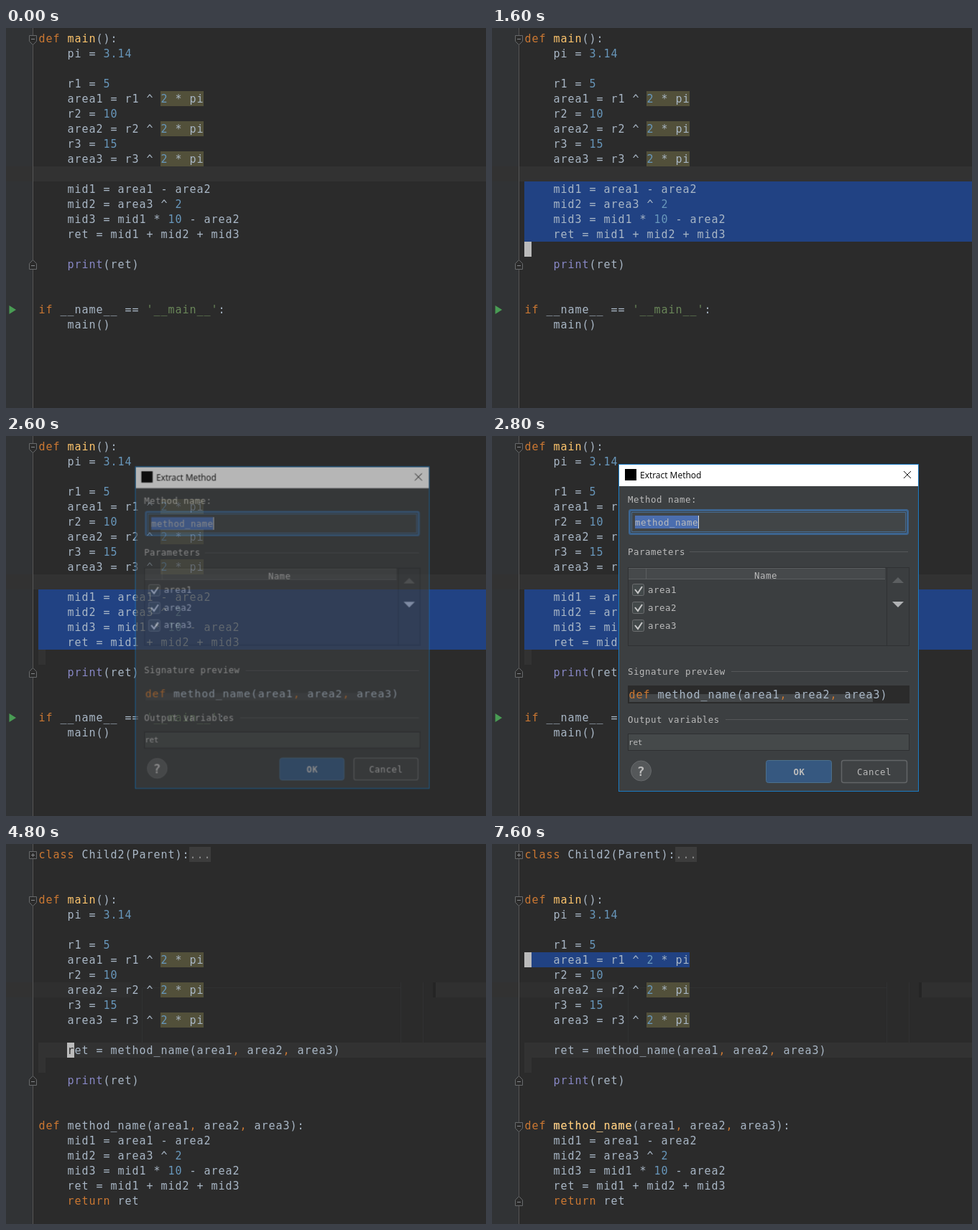
Write an HTML page that moves like this. It is 668 px wide and 530 px high and loops after 8000 ms.

```html
<!DOCTYPE html>
<html lang="en">
<head>
<meta charset="utf-8">
<title>Extract Method</title>
<style>
  html, body { margin: 0; width: 100%; height: 100%; overflow: hidden; background: #2b2b2b; }
  svg { display: block; width: 668px; height: 530px; }
  text { white-space: pre; fill: #a9b7c6; }
  .code { font: 15px "DejaVu Sans Mono", "Noto Sans Mono", monospace; letter-spacing: .97px; }
  .ui { font: 12.4px "DejaVu Sans Mono", "Noto Sans Mono", monospace; letter-spacing: .53px; fill: #bbb; }
  .small { font-size: 11px; letter-spacing: -.2px; }
  .title { font: 12px "Open Sans", "Noto Sans", sans-serif; }
</style>
</head>
<body>
<svg id="stage" viewBox="0 0 668 530"></svg>
<script>
const LOOP = 8000, LEFT = 45, CELL = 10, ROW = 21;
const stage = document.getElementById('stage');
const rowTop = row => 4 + ROW * row;
const colX = col => LEFT + CELL * col;

function add(parent, tag, attrs = {}, content) {
  const el = document.createElementNS('http://www.w3.org/2000/svg', tag);
  for (const key in attrs) el.setAttribute(key, attrs[key]);
  if (content !== undefined) el.textContent = content;
  parent.appendChild(el);
  return el;
}
const rect = (parent, x, y, width, height, fill, more) =>
  add(parent, 'rect', { x, y, width, height, fill, ...more });
const path = (parent, d, stroke, more) =>
  add(parent, 'path', { d, stroke, fill: 'none', ...more });

function play(el, frames) {
  const anim = el.animate(frames.map(f => ({ easing: 'step-end', ...f })),
    { duration: LOOP, iterations: Infinity });
  anim.startTime = 0;
}

// Shows an element only during the given [from, to] spans.
function during(el, ...spans) {
  const frames = [];
  if (spans[0][0] > 0) frames.push({ offset: 0, opacity: 0 });
  for (const [from, to] of spans) {
    frames.push({ offset: from / LOOP, opacity: 1 });
    if (to < LOOP) frames.push({ offset: to / LOOP, opacity: 0 });
  }
  frames.push({ offset: 1, opacity: frames[frames.length - 1].opacity });
  play(el, frames);
  return el;
}
const layer = (parent, ...spans) => during(add(parent, 'g'), ...spans);

const KEYWORD = '#cc7832', DEFINED = '#ffc66d', NUMBER = '#6897bb';
const STRING = '#6a8759', BUILTIN = '#8888c6', PLAIN = '#a9b7c6';
const TOKENS = /'[^']*'|\w+(?:\.\d+)?|[^\s\w]/g;

function colorOf(token, before) {
  if (/^(def|if|class|return|,)$/.test(token)) return KEYWORD;
  if (token[0] === "'") return STRING;
  if (/^\d/.test(token)) return NUMBER;
  if (token === 'print') return BUILTIN;
  if (token === 'main' && before.endsWith('def ')) return DEFINED;
  return PLAIN;
}

function codeText(parent, x, y, line) {
  const text = add(parent, 'text', { class: 'code', y });
  for (const match of line.matchAll(TOKENS)) {
    const fill = colorOf(match[0], line.slice(0, match.index));
    add(text, 'tspan', { x: x + CELL * match.index + .5, style: `fill:${fill}` }, match[0]);
  }
}
const codeLines = (parent, row, lines) => lines.forEach((line, i) =>
  line && codeText(parent, LEFT, rowTop(row + i) + 16, line));

const cells = (parent, row, col, count, fill, rows = 1) =>
  rect(parent, colX(col), rowTop(row), count * CELL, rows * ROW, fill);

function foldMark(parent, row, kind) {
  const y = rowTop(row);
  const outline = {
    open: `M32.5 ${y + 6.5}h10v8l-5 5l-5-5z`,
    close: `M32.5 ${y + 17.5}v0v14h10v-8l-5-5l-5 5z`.replace('v0v14', ''),
    folded: `M32.5 ${y + 6.5}h10v10h-10z`
  }[kind];
  path(parent, outline, '#686a6c', { fill: '#2b2b2b' });
  const mid = y + (kind === 'close' ? 12.5 : 11.5);
  path(parent, `M35 ${mid}h5` + (kind === 'folded' ? `M37.5 ${mid - 2.5}v5` : ''), '#85878a');
}

const setup = ['def main():', '    pi = 3.14', '',
  '    r1 = 5', '    area1 = r1 ^ 2 * pi',
  '    r2 = 10', '    area2 = r2 ^ 2 * pi',
  '    r3 = 15', '    area3 = r3 ^ 2 * pi'];
const body = ['    mid1 = area1 - area2', '    mid2 = area3 ^ 2',
  '    mid3 = mid1 * 10 - area2', '    ret = mid1 + mid2 + mid3'];
const extracted = ['def method_name(area1, area2, area3):', ...body, '    return ret'];

const HIGHLIGHT = '#323232', SELECTION = '#214283', DUPLICATE = '#52503a', CARET = '#bbbbbb';
const BEFORE = [0, 4800], AFTER = [4800, LOOP];

function drawEditor() {
  rect(stage, 0, 0, 668, 530, '#2b2b2b');
  rect(stage, 0, 0, 37, 530, '#313335');
  rect(stage, 0, rowTop(9), 37, ROW, HIGHLIGHT);
  rect(stage, 37, 0, 1, 530, '#555555');

  const before = layer(stage, BEFORE);
  rect(before, 38, rowTop(9), 630, ROW, HIGHLIGHT);
  [4, 6, 8].forEach(row => cells(before, row, 17, 6, DUPLICATE));
  rect(layer(before, [1600, 4800]), LEFT, rowTop(10), 623, ROW * 4, SELECTION);
  codeLines(before, 0, [...setup, '', ...body, '', '    print(ret)']);
  foldMark(before, 0, 'open');
  foldMark(before, 15, 'close');

  const entry = layer(before, [0, 4600]);
  codeLines(entry, 18, ["if __name__ == '__main__':", '    main()']);
  add(entry, 'path', { d: 'M4.5 387l9.5 6l-9.5 6z', fill: '#499c54' });
  codeLines(layer(before, [4600, 4800]), 18, extracted);

  const after = layer(stage, AFTER);
  rect(after, 38, rowTop(9), 137, ROW, '#2f2f2f');
  rect(after, 598, rowTop(9), 70, ROW, '#303030');
  rect(after, 594, rowTop(9), 4, ROW, '#252525');
  path(after, 'M190 200.5H549M189.5 201V277M549.5 193V277M580.5 193V277', '#303132');
  rect(after, LEFT, rowTop(13), 623, ROW, HIGHLIGHT);
  [7, 9, 11].forEach(row => cells(after, row, 17, 6, DUPLICATE));
  cells(layer(after, [5800, 6000], [6400, 6800]), 13, 4, 1, '#40332b');
  cells(layer(after, [5000, 6800]), 15, 10, 3, '#344134');
  cells(layer(after, [7600, LOOP]), 7, 0, 23, SELECTION);
  cells(after, 0, 21, 3, '#3c3c3c');
  codeLines(after, 0, ['class Child2(Parent):', '', '', ...setup, '',
    '    ret = method_name(area1, area2, area3)', '', '    print(ret)', '', '', ...extracted]);
  add(after, 'text', { class: 'code', x: colX(21) + .5, y: 20, style: 'fill:#8c8c8c' }, '...');
  foldMark(after, 0, 'folded');
  foldMark(after, 3, 'open');
  foldMark(after, 15, 'close');

  const parsed = layer(after, [5000, LOOP]);
  add(parsed, 'text', { class: 'code', x: colX(4) + .5, y: rowTop(18) + 16, style: `fill:${DEFINED}` }, 'method_name');
  foldMark(parsed, 18, 'open');
  foldMark(parsed, 23, 'close');

  cells(layer(stage, [2200, LOOP]), 14, 0, 1, HIGHLIGHT);
}

function drawCarets() {
  [[10, 800, 1600], [14, 1600, 2200], [8, 6400, 7000], [7, 7000, LOOP]]
    .forEach(([row, from, to]) => cells(layer(stage, [from, to]), row, 0, 1, CARET));
  const onRet = layer(stage, [4800, 5800], [6000, 6400]);
  cells(onRet, 13, 4, 1, CARET);
  add(onRet, 'text', { class: 'code', x: colX(4) + .5, y: rowTop(13) + 16, style: 'fill:#2b2b2b' }, 'r');

  [[279, 2200, 2600], [275, 5400, 6000]].forEach(([y, from, to]) =>
    path(layer(stage, [from, to]), `M57 ${y + 1.5}h8M61.5 ${y + 1}v16M57 ${y + 16.5}h8`, '#c8c8c8'));
}

function drawDialog() {
  const dialog = add(stage, 'g', { style: 'transform-origin:385px 268px' });
  play(dialog, [
    { offset: 0, opacity: 0, transform: 'none' },
    { offset: 2600 / LOOP, opacity: .66, transform: 'translate(-.5px,-.4px) scale(.981,.984)' },
    { offset: 2800 / LOOP, opacity: 1, transform: 'none' },
    { offset: 4800 / LOOP, opacity: 0, transform: 'none' },
    { offset: 1, opacity: 0, transform: 'none' }
  ]);
  const label = (x, center, content, more) =>
    add(dialog, 'text', { class: 'ui', x, y: center + 4.5, ...more }, content);
  const middle = { 'text-anchor': 'middle' };
  const section = (center, name, lineX) => {
    label(189, center, name);
    path(dialog, `M${lineX} ${center + .5}H579`, '#555759');
  };

  rect(dialog, 177, 40, 416, 455, '#3c3f41');
  rect(dialog, 177, 40, 416, 30, '#ffffff');
  rect(dialog, 185, 46, 16, 16, '#000000');
  const title = (parent, fill) =>
    add(parent, 'text', { class: 'title', x: 206, y: 59, style: `fill:${fill}` }, 'Extract Method');
  const active = layer(dialog, [0, 4600]);
  title(active, '#000');
  path(active, 'M573 49l10 10M583 49l-10 10', '#111');
  rect(active, 176.5, 39.5, 417, 456, 'none', { stroke: '#1a7bc4' });
  const inactive = layer(dialog, [4600, LOOP]);
  title(inactive, '#999');
  rect(inactive, 176.5, 39.5, 417, 456, 'none', { stroke: '#45494b' });

  label(189, 88, 'Method name:');
  rect(dialog, 191.5, 103.5, 387, 33, '#3d4144', { stroke: '#3d6590', 'stroke-width': 3, rx: 2 });
  rect(dialog, 194.5, 106.5, 381, 27, '#414547', { stroke: '#466d94' });
  rect(dialog, 199, 111, 88, 18, '#4b6eaf');
  label(199, 120, 'method_name');
  rect(layer(dialog, [2600, 3000], [3600, 4000], [4600, 4800]), 287, 111, 1, 18, '#dddddd');

  section(161, 'Parameters', 275);
  rect(dialog, 189.5, 183.5, 391, 109, '#3b3e40', { stroke: '#2f3133' });
  rect(dialog, 190, 185, 357, 14, '#46494b');
  path(dialog, 'M190 184.5H547M190 199.5H547M214.5 184V200', '#5b5e60');
  path(dialog, 'M549.5 184V293', '#2f3133');
  label(381, 194, 'Name', middle);
  add(dialog, 'path', { d: 'M557 205l8-8l8 8z', fill: '#5c5f61' });
  add(dialog, 'path', { d: 'M557 231h16l-8 8z', fill: '#b0b2b4' });
  ['area1', 'area2', 'area3'].forEach((name, i) => {
    const y = 214 + 25 * i;
    rect(dialog, 195.5, y - 7.5, 16, 16, '#43494a', { stroke: '#6b6d6f', rx: 2 });
    path(dialog, `M199 ${y}l4 5l6-9`, '#c8c8c8', { 'stroke-width': 2 });
    label(217, y, name);
  });

  section(328, 'Signature preview', 333);
  rect(layer(dialog, [2800, 4800]), 189, 348, 392, 25, '#2b2b2b');
  rect(dialog, 191, 360, 339, 11, '#444749');
  codeText(dialog, 190, 366, 'def method_name(area1, area2, area3)');

  section(395, 'Output variables', 325);
  rect(dialog, 189.5, 415.5, 391, 23, '#45494a', { stroke: '#2e3032' });
  label(190, 426, 'ret', { class: 'ui small' });

  add(dialog, 'circle', { cx: 207.5, cy: 467, r: 14, fill: '#55585a', stroke: '#66696b' });
  label(207.5, 469, '?', { ...middle, style: 'font-size:18px;font-weight:700' });
  rect(dialog, 381.5, 452.5, 91, 31, '#365880', { stroke: '#4c708c', rx: 3 });
  label(427.5, 468, 'OK', { ...middle, style: 'font-weight:700' });
  rect(dialog, 486.5, 452.5, 91, 31, '#3f4244', { stroke: '#626567', 'stroke-width': 1.5, rx: 3 });
  label(532, 468, 'Cancel', middle);
}

drawEditor();
drawCarets();
drawDialog();
</script>
</body>
</html>
```
